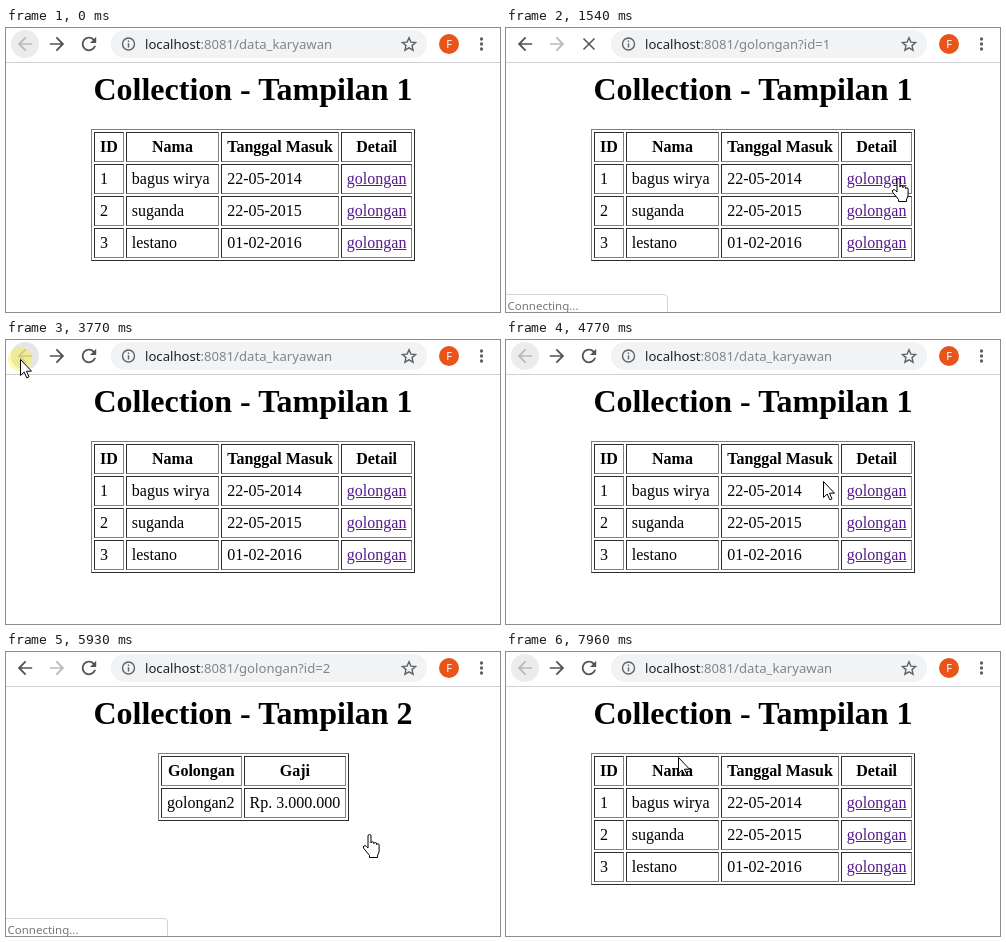
These frames come from a looping animation (494 by 284 pixels, 8000 ms). An HTML page:

```html
<!DOCTYPE html>
<html lang="id">
<head>
<meta charset="utf-8">
<title>Collection</title>
<style>
html, body { margin: 0; width: 100%; height: 100%; overflow: hidden; background: #fff; }
#stage { position: relative; width: 494px; height: 284px; overflow: hidden; }
svg { position: absolute; left: 0; top: 0; }
svg text { font-family: "Noto Sans", "Open Sans", sans-serif; }
section { position: absolute; top: 43px; width: 494px; font: 16px/18px "Liberation Serif", "Times New Roman", serif; color: #000; }
h1 { margin: 0; height: 58px; font-size: 32px; line-height: 36px; text-align: center; }
#list table { margin-left: 85px; }
#detail table { margin-left: 152px; }
.name { width: 81.4px; }
#grade { width: 68.6px; }
u { color: #551a8b; }
[hidden] { display: none; }
</style>
</head>
<body>
<div id="stage">
  <section id="list">
    <h1>Collection - Tampilan 1</h1>
    <table border="1" cellpadding="5" cellspacing="2">
      <tr><th>ID</th><th class="name">Nama</th><th>Tanggal Masuk</th><th>Detail</th></tr>
      <tr><td>1</td><td>bagus wirya</td><td>22-05-2014</td><td><u>golongan</u></td></tr>
      <tr><td>2</td><td>suganda</td><td>22-05-2015</td><td><u>golongan</u></td></tr>
      <tr><td>3</td><td>lestano</td><td>01-02-2016</td><td><u>golongan</u></td></tr>
    </table>
  </section>
  <section id="detail" hidden>
    <h1>Collection - Tampilan 2</h1>
    <table border="1" cellpadding="5" cellspacing="2">
      <tr><th>Golongan</th><th>Gaji</th></tr>
      <tr><td id="grade"></td><td id="pay"></td></tr>
    </table>
  </section>

  <svg width="494" height="284" fill="none">
    <path d="M0 34.5H494" stroke="#d0d0d0"/>
    <circle id="hover" cx="19" cy="16" r="14"/>
    <defs><path id="arrow" d="M8 -.9H-4.2L1.4 -6.6 0 -8 -8 0 0 8 1.4 6.6 -4.2 .9H8z"/></defs>
    <use id="back" href="#arrow" transform="translate(19 16) scale(.9)"/>
    <use id="next" href="#arrow" transform="translate(51 16) scale(-.9 .9)"/>
    <path id="reload" transform="translate(72.2 5.2) scale(.9)" fill="#505357" d="M17.65 6.35C16.2 4.9 14.21 4 12 4c-4.42 0-7.99 3.58-7.99 8s3.57 8 7.99 8c3.73 0 6.84-2.55 7.73-6h-2.08c-.82 2.33-3.04 4-5.65 4-3.31 0-6-2.69-6-6s2.69-6 6-6c1.66 0 3.14.69 4.22 1.78L13 11h7V4z"/>
    <path id="stop" d="M77.5 10.5l11 11m0-11l-11 11" stroke="#505357" stroke-width="1.5"/>
    <rect x="105" y="2" width="316" height="28" rx="14" fill="#f1f3f4"/>
    <g stroke="#5f6368" stroke-width="1.4">
      <circle cx="122.5" cy="16" r="6"/>
      <path d="M122.5 12.5v1.6m0 1.2v4.2"/>
      <path d="M403 9.8l1.9 4.3 4.7.4-3.6 3.1 1.1 4.6-4.1-2.4-4.1 2.4 1.1-4.6-3.6-3.1 4.7-.4z"/>
    </g>
    <text x="139" y="21" font-size="13.15" fill="#202124">localhost<tspan id="path" fill="#80868b"></tspan></text>
    <circle cx="443" cy="16" r="10" fill="#e8541a"/>
    <text x="443" y="20" font-size="11" text-anchor="middle" fill="#fff">F</text>
    <path d="M475.5 11h0m0 5h0m0 5h0" stroke="#5f6368" stroke-width="3.4" stroke-linecap="round"/>

    <g id="status">
      <path d="M-1 285V266.5H158q3.5 0 3.5 3.5V285z" fill="#fff" stroke="#d3d3d3"/>
      <text x="1.5" y="282" font-size="11.5" fill="#777">Connecting...</text>
    </g>
    <circle id="glow" r="12" fill="#fff000"/>
    <g id="cursor" fill="#fff" stroke="#000" stroke-linejoin="round">
      <path id="pointer" d="M.5 .5v16l3.7-3.5 2.6 5.8 2.2-1-2.5-5.6h5z"/>
      <path id="hand" transform="translate(-6.5)" d="M5.5 14V2a1.5 1.5 0 0 1 3 0V9q0-1.3 1.4-1.3t1.5 1.3v.6q.2-1 1.4-1t1.4 1.3v.7q.2-.9 1.2-.9t1.2 1.4V17q0 2-1.5 4V23.5H7V21.5L1.2 14.3q-1-1.6.2-2.4t2.6.6z"/>
    </g>
  </svg>
</div>
<script>
const LOOP = 8000;
const $ = id => document.getElementById(id);
const show = (id, on) => $(id).style.display = on ? "" : "none";
const within = (t, spans) => spans.some(([a, b]) => t >= a && t < b);

// Cursor path: time, x, y
const route = [
  [60, 409, 234], [860, 401, 151], [960, 392, 150], [1540, 392, 150],
  [1670, 251, 110], [2370, 222, 25], [2570, 217, 40], [3070, 18, 17],
  [3370, 14, 19], [4170, 14, 19], [4770, 317, 141], [5070, 346, 173],
  [5170, 363, 182], [5930, 363, 182], [6830, 16, 28], [7060, 16, 20],
  [7860, 16, 20], [7960, 172, 105]
];
const clicks = [[1160, 1360], [3370, 3770], [5470, 5670], [7060, 7460]];
const loads = [[1470, 1570], [5830, 5930]];
const messages = [[1470, 1770], [5830, 6030]];

// The screen is sampled ten times a second
function sample(t) {
  const shift = t < 1570 || t >= 7160 ? 60 : t < 5930 ? 70 : 30;
  return Math.floor((t - shift) / 100) * 100 + shift;
}

function place(t) {
  const i = route.findIndex(p => p[0] > t);
  if (i < 0) return route.at(-1).slice(1);
  if (i === 0) return route[0].slice(1);
  const [t0, x0, y0] = route[i - 1], [t1, x1, y1] = route[i];
  const k = (t - t0) / (t1 - t0);
  return [x0 + (x1 - x0) * k, y0 + (y1 - y0) * k].map(Math.round);
}

// Full strength inside a span, half for a moment after it
const fade = (t, spans) => within(t, spans) ? 1 : within(t - 100, spans) ? .5 : 0;

function draw(t) {
  const detail = within(t, [[1570, 3770], [5930, 7460]]);
  const loading = within(t, loads);
  const forward = detail || loading;
  const id = t < 3770 ? 1 : 2;
  const [x, y] = place(sample(t));

  $("list").hidden = detail;
  $("detail").hidden = !detail;
  $("grade").textContent = "golongan" + id;
  $("pay").textContent = `Rp. ${5 - id}.000.000`;
  $("path").textContent = ":8081/" + (forward ? "golongan?id=" + id : "data_karyawan");

  $("back").setAttribute("fill", forward ? "#505357" : "#b9babc");
  $("next").setAttribute("fill", forward ? "#b9babc" : "#505357");
  $("hover").setAttribute("fill", t >= 60 && x < 33 && y < 31 ? "#e6e6e6" : forward ? "none" : "#ececec");
  show("reload", !loading);
  show("stop", loading);
  $("status").setAttribute("opacity", fade(t, messages));

  const hand = within(t, [[960, 1570], [5170, 6030]]);
  show("cursor", t >= 60);
  show("hand", hand);
  show("pointer", !hand);
  for (const part of ["cursor", "glow"]) $(part).setAttribute("transform", `translate(${x} ${y})`);
  $("glow").setAttribute("opacity", .65 * fade(t, clicks));
}

function tick() {
  draw(performance.now() % LOOP);
  requestAnimationFrame(tick);
}
tick();
</script>
</body>
</html>
```
